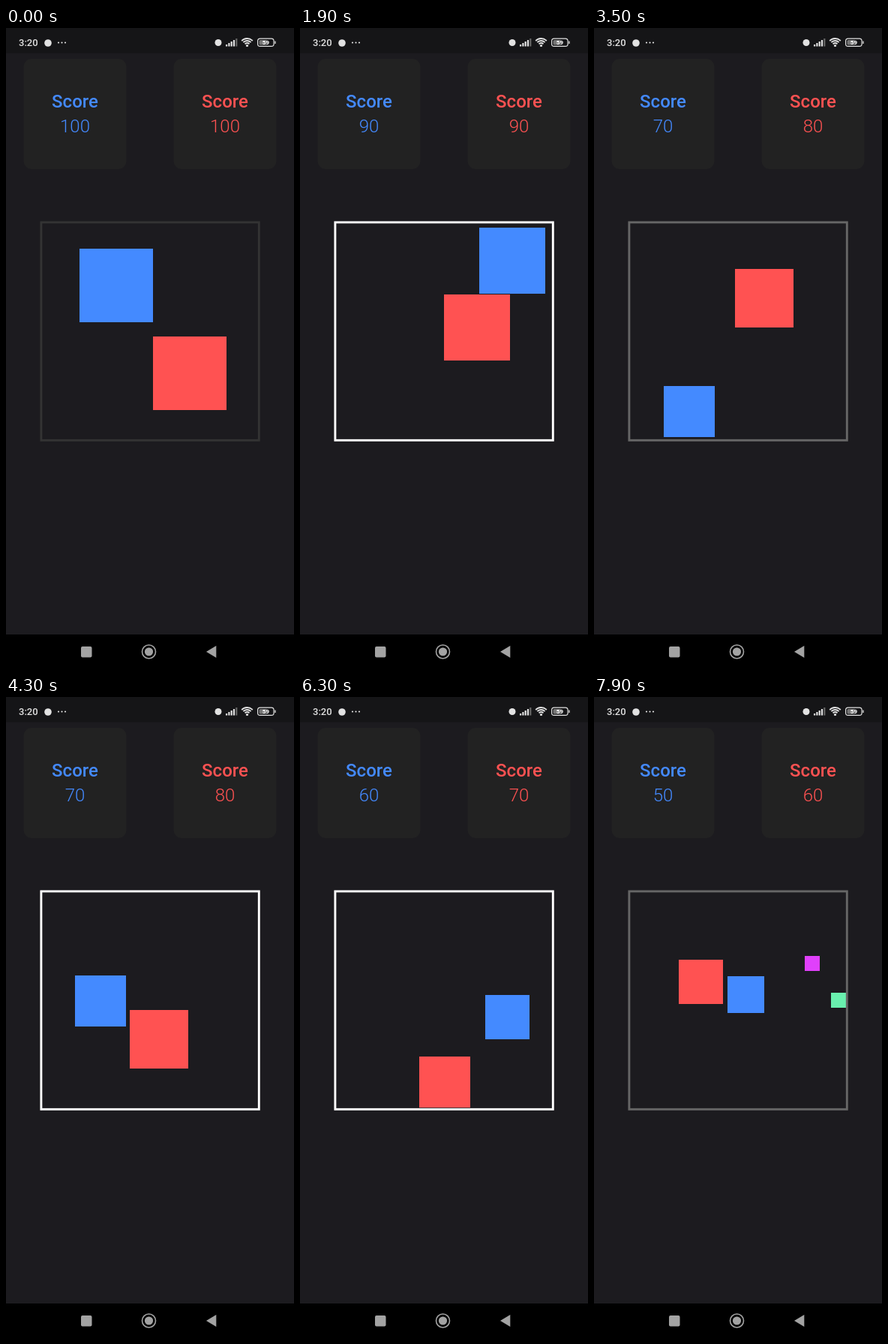
An HTML page with a canvas that plays this animation: 384x854 px, repeating every 8000 ms.

```html
<!DOCTYPE html>
<html lang="en">
<head>
<meta charset="utf-8">
<title>Square duel</title>
<style>
html, body { margin: 0; width: 100%; height: 100%; overflow: hidden; background: #1c1b1f; }
canvas { display: block; }
</style>
</head>
<body>
<canvas id="stage" width="384" height="854"></canvas>
<script>
const ctx = document.getElementById('stage').getContext('2d');
const LOOP = 8000;
const UNIT = 0.978; // pixels per score point
const SHADES = ['#333333', '#666666', '#ffffff'];

// A pose is a centre and a score; bx and by are where the way to it bounces.
const players = [
  {
    color: '#448aff', labelX: 92,
    poses: [
      { t: 760, x: 146.8, y: 342.6, score: 100 },
      { t: 900, x: 164.3, y: 360, score: 100 },
      { t: 1900, x: 282.7, y: 310, score: 90, by: 395 },
      { t: 3500, x: 127.4, y: 511.4, score: 70, bx: 299, by: 300 },
      { t: 5200, x: 231.4, y: 286.9, score: 60, bx: 80 },
      { t: 6300, x: 276, y: 425.8, score: 60, bx: 309 },
      { t: 7900, x: 202.4, y: 396.7, score: 50, bx: 150, by: 521 }
    ]
  },
  {
    color: '#ff5252', labelX: 292,
    poses: [
      { t: 760, x: 244.6, y: 460, score: 100 },
      { t: 900, x: 262.2, y: 478, score: 100 },
      { t: 1900, x: 236, y: 399, score: 90, bx: 291, by: 501 },
      { t: 3500, x: 226.8, y: 359.6, score: 80, bx: 299, by: 474 },
      { t: 5200, x: 304.3, y: 457.3, score: 70, bx: 171, by: 511 },
      { t: 6300, x: 193.4, y: 513.8, score: 70, by: 406 },
      { t: 7900, x: 142, y: 379.4, score: 60, bx: 75 }
    ]
  }
];

// Constant speed from a to b, turning round at via.
function bounce(a, b, u, via = b) {
  const first = Math.abs(via - a);
  const way = u * (first + Math.abs(b - via));
  return way < first
    ? a + Math.sign(via - a) * way
    : via + Math.sign(b - via) * (way - first);
}

function poseAt(poses, t) {
  const i = poses.findIndex(p => p.t > t);
  if (i === 0) return poses[0];
  if (i < 0) return poses[poses.length - 1];
  const a = poses[i - 1], b = poses[i];
  const u = (t - a.t) / (b.t - a.t);
  return {
    x: bounce(a.x, b.x, u, b.bx),
    y: bounce(a.y, b.y, u, b.by),
    score: 10 * Math.round((a.score + (b.score - a.score) * u) / 10)
  };
}

function wallShade(t) {
  return SHADES[Math.floor(Math.max(0, t - 280) / 700) % SHADES.length];
}

function rect(x, y, w, h, color) {
  ctx.fillStyle = color;
  ctx.fillRect(x, y, w, h);
}

function square(cx, cy, size, color) {
  const side = Math.round(size);
  rect(Math.round(cx - size / 2), Math.round(cy - size / 2), side, side, color);
}

function round(x, y, w, h, r, color) {
  ctx.fillStyle = color;
  ctx.beginPath();
  ctx.roundRect(x, y, w, h, r);
  ctx.fill();
}

function dot(x, y, r, color) {
  ctx.fillStyle = color;
  ctx.beginPath();
  ctx.arc(x, y, r, 0, Math.PI * 2);
  ctx.fill();
}

function text(str, x, y, font, color, align = 'center') {
  ctx.font = font + ' Roboto, sans-serif';
  ctx.fillStyle = color;
  ctx.textAlign = align;
  ctx.fillText(str, x, y);
}

function statusBar() {
  const ink = '#e2e2e2';
  rect(0, 0, 384, 33.5, '#151517');
  text('3:20', 17, 24, '500 13px', ink, 'left');
  dot(56, 20, 4.8, ink);
  for (let i = 0; i < 3; i++) dot(70 + i * 4.5, 19.5, 1.1, ink);
  dot(283, 19.5, 4.5, ink);

  for (let i = 0; i < 5; i++) {
    const h = 2.5 + i * 2;
    rect(293 + i * 3.3, 24.5 - h, 2.2, h, i < 4 ? ink : '#666666');
  }

  ctx.strokeStyle = ink;
  ctx.lineWidth = 1.8;
  for (let r = 4; r <= 10; r += 3) {
    ctx.beginPath();
    ctx.arc(321.5, 24, r, -Math.PI * 0.76, -Math.PI * 0.24);
    ctx.stroke();
  }
  dot(321.5, 23.5, 1.6, ink);

  ctx.lineWidth = 1.2;
  ctx.beginPath();
  ctx.roundRect(335.6, 14.1, 21.5, 10.3, 3.2);
  ctx.stroke();
  round(337.5, 16, 11, 6.5, 1.5, '#777777');
  rect(358.3, 17.5, 1.3, 3.5, ink);
  text('59', 346.4, 22, '700 8px', '#ffffff');
}

function navBar() {
  const ink = '#a3a3a3';
  rect(0, 808, 384, 46, '#000000');
  round(100, 824, 14.5, 14.5, 2, ink);
  ctx.strokeStyle = ink;
  ctx.lineWidth = 1.6;
  ctx.beginPath();
  ctx.arc(190.5, 831, 9, 0, Math.PI * 2);
  ctx.stroke();
  dot(190.5, 831, 5.6, ink);
  ctx.fillStyle = ink;
  ctx.beginPath();
  ctx.moveTo(267, 831);
  ctx.lineTo(280.3, 823);
  ctx.lineTo(280.3, 839);
  ctx.fill();
}

function draw(t) {
  rect(0, 0, 384, 854, '#1c1b1f');
  statusBar();
  navBar();

  for (const { color, labelX, poses } of players) {
    const { x, y, score } = poseAt(poses, t);
    round(labelX - 68.5, 41, 137, 147, 11, '#222222');
    text('Score', labelX, 106, '500 24px', color);
    text(score, labelX, 139, '300 24px', color);
    square(x, y, score * UNIT, color);
  }

  if (t >= 7300) {
    square(291, 355.2, 20 * UNIT, '#e040fb');
    square(325.3, 404, 20 * UNIT, '#69f0ae');
  }

  ctx.strokeStyle = wallShade(t);
  ctx.lineWidth = 2.9;
  ctx.strokeRect(46.9, 258.9, 290.4, 290.4);
}

const start = performance.now();
function tick() {
  draw((performance.now() - start) % LOOP);
  requestAnimationFrame(tick);
}
tick();
</script>
</body>
</html>
```
